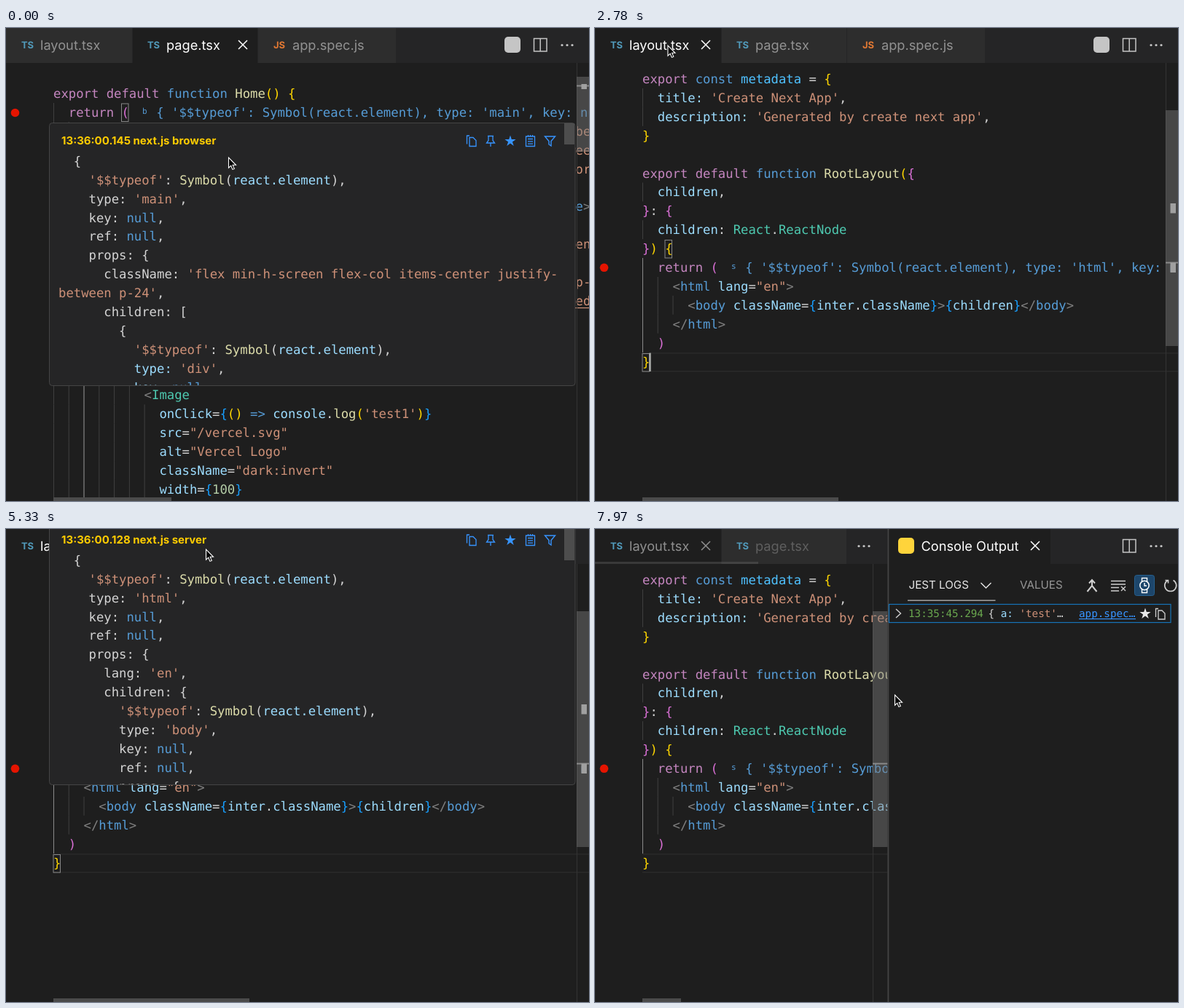
These frames come from a looping animation (800x650 px, 8 s). An HTML page:

```html
<!DOCTYPE html>
<html lang="en">
<head>
<meta charset="utf-8">
<title>Editor values</title>
<style>
html, body { margin: 0; width: 100%; height: 100%; overflow: hidden; background: #1e1e1e; }
svg { display: block; width: 800px; height: 650px; }
text { white-space: pre; text-rendering: geometricPrecision; }
.code { font: 17.25px "DejaVu Sans Mono", "Liberation Mono", monospace; }
.log { font: 14.25px "DejaVu Sans Mono", "Liberation Mono", monospace; }
.ui { font: 18.2px Inter, "Liberation Sans", sans-serif; }
.kind { font: 700 13px Inter, "Liberation Sans", sans-serif; }
.stamp { font: 700 15px Inter, "Liberation Sans", sans-serif; }
.head { font: 15.2px Inter, "Liberation Sans", sans-serif; }
</style>
</head>
<body>
<svg id="stage" viewBox="0 0 800 650"></svg>
<script>
const LOOP = 8000, CHAR = 10.385, LINE = 25.9, LEFT = 65;
const COLORS = {
  k: '#c586c0', b: '#569cd6', y: '#dcdcaa', g: '#ffd700', o: '#da70d6', u: '#179fff', a: '#9cdcfe',
  s: '#ce9178', p: '#808080', t: '#4ec9b0', w: '#d4d4d4', n: '#b5cea8', c: '#4fc1ff'
};
const stage = document.getElementById('stage');

const esc = s => s.replace(/&/g, '&amp;').replace(/</g, '&lt;');
const rect = (x, y, w, h, fill, more = '') =>
  `<rect x="${x}" y="${y}" width="${w}" height="${h}" fill="${fill}" ${more}/>`;
const path = (d, color, width = 1.4, more = '') =>
  `<path d="${d}" fill="none" stroke="${color}" stroke-width="${width}" ${more}/>`;
const label = (x, y, s, fill, cls = 'ui') =>
  `<text class="${cls}" x="${x}" y="${y}" fill="${fill}">${esc(s)}</text>`;

// Coloured text: "§" plus a letter picks the colour of what follows.
function rich(x, y, src, cls = 'code') {
  const spans = src.split('§').slice(1).map(part =>
    `<tspan fill="${COLORS[part[0]]}">${esc(part.slice(1))}</tspan>`);
  return `<text class="${cls}" x="${x}" y="${y}">${spans.join('')}</text>`;
}

// Lines start with their indent; the first one is centred at y.
function block(lines, x, y, guides) {
  return lines.map((line, i) => {
    const src = line.trimStart(), indent = line.length - src.length, mid = y + i * LINE;
    let out = '';
    if (guides) for (let g = 0; g < indent / 2; g++)
      out += rect(x + g * 2 * CHAR, mid - LINE / 2, 1, LINE, '#404040');
    return out + rich(x + indent * CHAR, mid + 6, src);
  }).join('');
}

const inlineValue = (mid, origin, type) =>
  label(187, mid + 2, origin, COLORS.b, 'log" style="font-size:11px') +
  label(206.3, mid + 6, `{ '$$typeof': Symbol(react.element), type: '${type}', key: null`, COLORS.b, 'code');

const pageLines = [
  '§kexport default §bfunction §yHome§g() {',
  '  §kreturn §o(',
  '    §p<§bmain §aclassName§w=§s"flex min-h-screen flex-col items-center justify-between p-24"',
  '      §p<§bdiv §aclassName§w=§s"z-10 w-full max-w-5xl items-center justify-between"',
  '        §p<§bp §aclassName§w=§s"fixed left-0 top-0 flex w-full justify-center border-b"',
  '          §wGet started by editing§b&nbsp;',
  '          §p<§bcode §aclassName§w=§s"font-mono font-bold"§p>§wsrc/app/page.tsx§p</§bcode§p>',
  '        §p</§bp§p>',
  '        §p<§bdiv §aclassName§w=§s"fixed bottom-0 left-0 flex h-48 w-full items-end"',
  '          §p<§ba',
  '            §aclassName§w=§s"pointer-events-none flex place-items-center gap-2"',
  '            §ahref§w=§s"https://vercel.com?utm_source=create-next-app&utm_medium',
  '            §atarget§w=§s"_blank"',
  '            §arel§w=§s"noopener noreferrer"',
  '          §p>',
  "            §wBy§u{§s' '§u}",
  '            §p<§tImage',
  "              §aonClick§w=§u{§g() §b=> §aconsole§w.§ylog§g(§s'test1'§g)§u}",
  '              §asrc§w=§s"/vercel.svg"',
  '              §aalt§w=§s"Vercel Logo"',
  '              §aclassName§w=§s"dark:invert"',
  '              §awidth§w=§u{§n100§u}'
];

const layoutLines = [
  '§kexport §bconst §cmetadata §w= §g{',
  "  §atitle: §s'Create Next App'§w,",
  "  §adescription: §s'Generated by create next app'§w,",
  '§g}',
  '',
  '§kexport default §bfunction §yRootLayout§g(§o{',
  '  §achildren§w,',
  '§o}§w: §o{',
  '  §achildren§w: §tReact§w.§tReactNode',
  '§o}§g) {',
  '  §kreturn §o(',
  '    §p<§bhtml §alang§w=§s"en"§p>',
  '      §p<§bbody §aclassName§w=§u{§ainter§w.§aclassName§u}§p>§u{§achildren§u}§p</§bbody§p>',
  '    §p</§bhtml§p>',
  '  §o)',
  '§g}'
];

const symbol = "§s'$$typeof'§w: §ySymbol§w(§areact.element§w),";
const pageValue = [
  '  §w{', '    ' + symbol, "    §wtype: §s'main'§w,", '    §wkey: §bnull§w,', '    §wref: §bnull§w,',
  '    §wprops: {', "      §wclassName: §s'flex min-h-screen flex-col items-center justify-",
  "§sbetween p-24'§w,", '      §wchildren: [', '        §w{', '          ' + symbol,
  "          §atype: §s'div'§w,", '          §akey: §bnull§w,'
];
const layoutValue = [
  '  §w{', '    ' + symbol, "    §wtype: §s'html'§w,", '    §wkey: §bnull§w,', '    §wref: §bnull§w,',
  '    §wprops: {', "      §wlang: §s'en'§w,", '      §wchildren: {', '        ' + symbol,
  "        §wtype: §s'body'§w,", '        §wkey: §bnull§w,', '        §wref: §bnull§w,', '        §wprops: {'
];

const cross = (x, color) => path(`M${x - 6} 17l12 12m0-12l-12 12`, color, 1.5);
const dots = x => [-7, 0, 7].map(d => `<circle cx="${x + d}" cy="23.5" r="1.6" fill="#c5c5c5"/>`).join('');
const splitIcon = path('M724.5 14.5h17.5v17.5h-17.5zM733.2 14.5v17.5', '#c5c5c5', 1.5);
const copyIcon = (x, y, c) => path(`M${x - 3} ${y - 5}h5l4 4v8h-9zM${x - 3} ${y - 7.5}h-3.5v11.5`, c, 1.3);
function star(x, y, color) {
  const pts = Array.from({ length: 10 }, (_, i) => {
    const a = i * Math.PI / 5, r = i % 2 ? 3.1 : 8;
    return (x + r * Math.sin(a)).toFixed(1) + ',' + (y - r * Math.cos(a)).toFixed(1);
  });
  return `<polygon points="${pts.join(' ')}" fill="${color}"/>`;
}

function tab(x, w, kind, name, kindColor, textX, active, closeX, color) {
  return rect(x, 0, w, 48, active ? '#1e1e1e' : '#2d2d2d') +
    label(textX - 26, 28, kind, kindColor, 'kind') +
    label(textX, 30, name, color) + (closeX ? cross(closeX, color) : '');
}
function tabs(active) {
  const tint = i => i === active ? '#ffffff' : '#929292';
  return rect(0, 0, 800, 48, '#252526') +
    tab(0, 173, 'TS', 'layout.tsx', '#519aba', 47, active === 0, active === 0 && 152, tint(0)) +
    tab(174, 171, 'TS', 'page.tsx', '#519aba', 220, active === 1, active === 1 && 325, tint(1)) +
    tab(346, 189, 'JS', 'app.spec.js', '#e37933', 393, false, 0, tint(2)) +
    rect(684, 12, 22, 22, '#c5c5c5', 'rx="5"') + splitIcon + dots(770);
}

const ruler = (x, top, bottom) =>
  rect(x, 48, 1, 602, '#333333') + rect(x, top, 800 - x, bottom - top, '#797979', 'opacity=".45"');
const box = (x, y) => rect(x, y, 9.5, 24.5, 'none', 'stroke="#888888"');
const caret = (x, y) => rect(x, y, 2.2, 25.5, '#aeafad');
const lineMark = y => rect(LEFT, y, 735, 1.6, '#292929') + rect(LEFT, y + 25, 735, 1.6, '#292929');
const breakpoint = y => `<circle cx="12.5" cy="${y}" r="5.8" fill="#e51400"/>`;

function popup(stamp, lines, dy, thumb) {
  const blue = '#3794ff';
  return `<g transform="translate(0 ${dy})">` +
    rect(59.5, 130.5, 721.5, 361, '#252526', 'stroke="#454545" rx="4"') +
    label(76, 159.5, stamp, '#ffcc00', 'stamp') +
    copyIcon(639, 155.5, blue) +
    path('M661 148.5h8m-7 0v6l-2.5 3.5h11l-2.5-3.5v-6m-3 9.5v5', blue, 1.3) +
    star(692, 155.5, blue) +
    path('M713.5 149h12v13.5h-12zM716 152.5h7m-7 3.3h7m-7 3.3h7M716.5 147v2m3-2v2m3-2v2', blue, 1.3) +
    path('M739.5 149h14l-5.5 6.5v6.5l-3-2v-4.5z', blue, 1.4) +
    `<g clip-path="url(#pop)">${block(lines, 72, 182.8)}</g>` +
    rect(766, 131, 14, thumb, '#4d4d4d') + '</g>';
}

function splitView() {
  const dim = '#8f8f8f', dimmer = '#5f5f5f', light = '#d0d0d0';
  return rect(0, 0, 402, 48, '#252526') +
    tab(0, 173, 'TS', 'layout.tsx', '#519aba', 47, true, 152, dim) +
    tab(174, 171, 'TS', 'page.tsx', '#519aba', 220, false, 0, dimmer) +
    rect(346, 0, 56, 48, '#252526') + rect(0, 45, 224, 3, '#797979', 'opacity=".3"') + dots(369) +
    ruler(381, 113, 437) + rect(381, 321.5, 21, 2, '#8a8a8a') + rect(LEFT, 645, 53, 5, '#4b4b4b') +
    rect(401.5, 0, 398.5, 650, '#1e1e1e') + rect(403, 0, 397, 48, '#252526') +
    rect(403, 0, 222, 48, '#1e1e1e') + rect(401.5, 0, 1.8, 650, '#444444') +
    rect(416, 12, 22, 22, '#ffd43b', 'rx="5"') + label(447.5, 30, 'Console Output', '#ffffff') +
    cross(604, '#ffffff') + splitIcon + dots(770) +
    label(430.5, 82, 'JEST LOGS', '#e7e7e7', 'head') + path('M529.5 74l7 7 7-7', '#e7e7e7') +
    rect(429, 97.5, 120.5, 1.3, '#b8b8b8') + label(583, 82, 'VALUES', '#969696', 'head') +
    path('M682 71v7l-6.5 8M682 78l6.5 8M678 74.5l4-4.5 4 4.5', light, 2) +
    path('M708 71.5h20m-20 4.5h20m-20 4.5h11m-11 4.5h11M722 79l6 6m0-6l-6 6', light) +
    rect(740.5, 63.5, 27, 28, '#1d466b', 'rx="3" stroke="#26608f"') +
    `<circle cx="754" cy="77.5" r="6.2" fill="none" stroke="#fff" stroke-width="1.5"/>` +
    path('M750.5 72v-4.5h7v4.5m-7 11v4.5h7v-4.5M754 74v4h3', '#ffffff') +
    path('M786 70.5a8 8 0 1 0 7.5 0M782.5 70.5h4v4', light, 1.6) +
    rect(403.5, 103.5, 386.5, 25, 'none', 'stroke="#1673b8" stroke-width="1.2"') +
    path('M413 110l6.5 6-6.5 6', light) + label(430, 121, '13:35:45.294', '#6aa84f', 'log') +
    rich(539.5, 121, "§w{ §aa: §s'test'§w…", 'log') + label(664, 121, 'app.spec…', '#3794ff', 'log') +
    rect(664, 123, 78, 1.1, '#3794ff') + star(755, 116.5, '#e8e8e8') + copyIcon(776, 117, light);
}

const group = (id, body) => `<g id="${id}">${body}</g>`;
stage.innerHTML =
  '<clipPath id="pop"><rect x="60" y="131" width="706" height="360"/></clipPath>' +
  rect(0, 0, 800, 650, '#1e1e1e') +
  group('page',
    group('pageLine', lineMark(103)) +
    block(pageLines, LEFT, 90, true) + inlineValue(116, 'b', 'main') +
    rect(252, 384, 548, 1.2, COLORS.s) +
    group('guideOld', rect(106.5, 155, 1, 495, '#8a8a8a')) +
    group('guideNew', rect(85.8, 129, 1, 521, '#8a8a8a')) +
    breakpoint(116.5) + box(158.5, 104) + group('pageCaret', caret(168.5, 103.5)) +
    ruler(783, 67, 170) +
    group('markOld', rect(783, 78.5, 17, 2, '#8a8a8a') + rect(789.5, 77, 7.5, 7, '#a0a0a0')) +
    group('markNew', rect(783, 74.5, 17, 2, '#8a8a8a')) +
    rect(LEFT, 645, 162, 5, '#4b4b4b') + tabs(1)) +
  group('layout',
    lineMark(446) + block(layoutLines, LEFT, 70, true) + inlineValue(329.3, 's', 'html') +
    rect(LEFT, 316, 1, 130, '#8a8a8a') + breakpoint(329.3) +
    group('single',
      box(96, 291.5) + box(65, 447.5) + group('caret', caret(74.5, 446.5)) +
      ruler(783, 113, 437) + rect(783, 321.5, 17, 2, '#8a8a8a') +
      rect(789.5, 241, 7.5, 13.5, '#a0a0a0') + rect(789.5, 322.5, 7.5, 13.5, '#a0a0a0') +
      rect(LEFT, 645, 269, 5, '#4b4b4b') + tabs(0)) +
    group('split', splitView())) +
  group('pagePop', popup('13:36:00.145 next.js browser', pageValue, 0, 29)) +
  group('layoutPop', popup('13:36:00.128 next.js server', layoutValue, -140, 52)) +
  group('arrow', '<path d="M0 0V14.2L3.2 11.2 5.4 16.4 7.8 15.4 5.6 10.3H10Z" fill="#000" stroke="#fff" stroke-width="1.1"/>') +
  group('beam', ['#ffffff 3', '#000000 1'].map(s => {
    const [color, width] = s.split(' ');
    return path('M-4 -8.5Q0 -8.5 0 -6V6Q0 8.5 -4 8.5M4 -8.5Q0 -8.5 0 -6M0 6Q0 8.5 4 8.5M-2 2h4', color, width);
  }).join(''));

const CLICK_LINE = 2110, OPEN_LAYOUT = 2650, CLOSE_POP = 5830, SPLIT = 7100;
// Pointer stops: time, x, y
const stops = [
  [300, 305.5, 178], [920, 160.5, 163], [970, 157, 161], [1070, 185, 167], [1130, 185, 167],
  [1330, 277, 167], [1630, 277, 167], [1810, 264, 107], [2110, 264, 107], [2600, 100, 24],
  [2960, 100, 24], [3400, 390, 300], [3670, 375.5, 331], [4150, 375.5, 331], [4800, 130, 36],
  [4980, 110, 30], [5330, 274.5, 28], [5630, 274.5, 28], [5720, 300, -25], [5870, 815, -25],
  [6000, 815, 150], [6230, 662, 233], [6800, 694, 42], [6930, 695, 24], [7200, 695, 24],
  [7640, 528, 62], [7690, 528, 62], [7970, 411.5, 228]
];

function pointer(t) {
  const i = stops.findIndex(s => s[0] > t);
  if (i === 0) return stops[0].slice(1);
  if (i < 0) return stops[stops.length - 1].slice(1);
  const [t0, x0, y0] = stops[i - 1], [t1, x1, y1] = stops[i];
  const p = (t - t0) / (t1 - t0), e = p * p * (3 - 2 * p);
  return [x0 + (x1 - x0) * e, y0 + (y1 - y0) * e];
}

const parts = {};
stage.querySelectorAll('g[id]').forEach(g => parts[g.id] = g);
const show = (id, on) => { parts[id].style.display = on ? '' : 'none'; };
const within = (t, a, b) => t >= a && t < b;

function draw(t) {
  const clicked = t >= CLICK_LINE, opened = t >= OPEN_LAYOUT, split = t >= SPLIT;
  show('page', !opened);
  show('layout', opened);
  for (const id of ['pageLine', 'guideNew', 'markNew']) show(id, clicked);
  for (const id of ['guideOld', 'markOld', 'pagePop']) show(id, !clicked);
  show('pageCaret', clicked && t < CLICK_LINE + 500);
  show('caret', Math.floor((t - OPEN_LAYOUT) / 500) % 2 === 0);
  show('single', !split);
  show('split', split);
  show('layoutPop', within(t, 3860, CLOSE_POP));
  parts.layoutPop.style.opacity = Math.min(1, Math.max(0, (t - 3860) / 130));

  const [x, y] = pointer(t);
  const beam = y > 48 && (within(t, 1770, OPEN_LAYOUT) || within(t, 2960, 3550) || within(t, 5990, 6900));
  show('beam', beam);
  show('arrow', !beam);
  parts[beam ? 'beam' : 'arrow'].setAttribute('transform', `translate(${x.toFixed(2)} ${y.toFixed(2)})`);
}

const start = performance.now();
function tick() {
  draw((performance.now() - start) % LOOP);
  requestAnimationFrame(tick);
}
draw(0);
requestAnimationFrame(tick);
</script>
</body>
</html>
```
